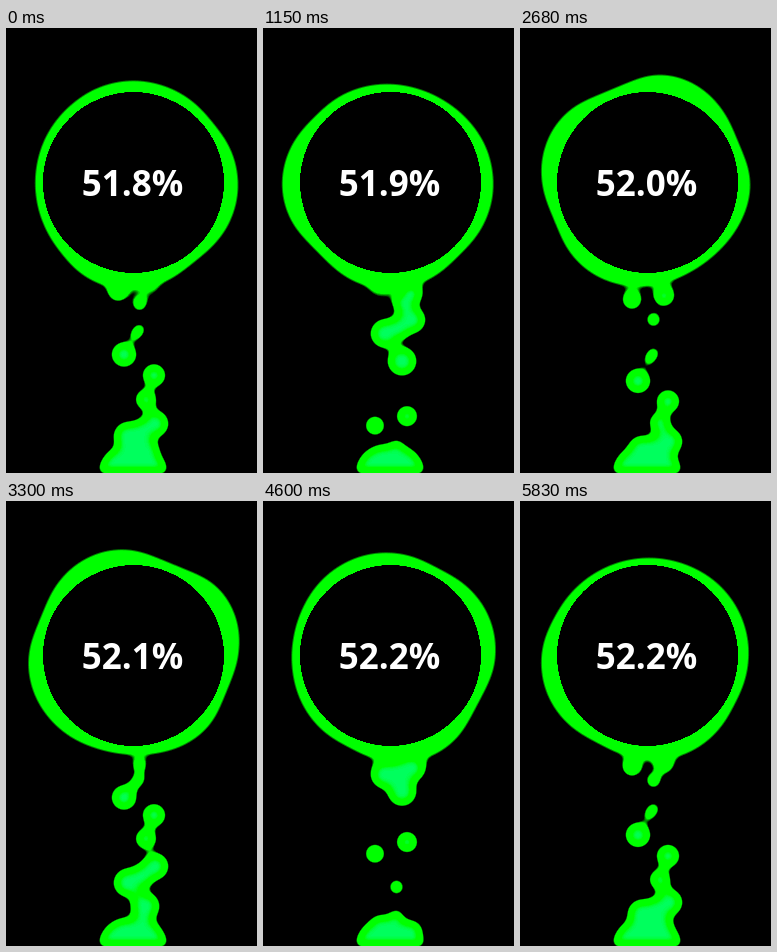
These frames come from a looping animation (251x445 px, 5900 ms). An HTML page:

```html
<!DOCTYPE html>
<html lang="en">
<head>
<meta charset="utf-8">
<title>Charging</title>
<style>
html, body { margin: 0; width: 100%; height: 100%; overflow: hidden; background: #000; }
div, i { position: absolute; }
/* blurred shapes under a strong contrast melt into each other */
#goo { left: 0; top: 0; width: 251px; height: 445px; overflow: hidden; background: #000; filter: contrast(10); }
#halo { left: 0; top: 0; width: 100%; height: 100%; filter: blur(8px); }
#ring { left: 27px; top: 54.5px; width: 200px; height: 200px; background: #0f0; }
#bubbles { left: 0; top: 0; width: 100%; height: 100%; filter: blur(5px); }
#bubbles i { border-radius: 50%; background: #00ff7c; }
#bubbles #base { left: 92px; top: 416px; width: 70px; height: 30px; border-radius: 30px 30px 0 0; }
#hole { left: 36.5px; top: 64px; width: 181px; height: 181px; border-radius: 50%; background: #000; }
#level { left: 0; top: 137px; width: 253px; text-align: center; color: #fff; font: bold 35px/1 "Noto Sans", "Open Sans", sans-serif; }
</style>
</head>
<body>
<div id="goo">
  <div id="halo"><div id="ring"></div></div>
  <div id="bubbles"><i id="base"></i></div>
  <div id="hole"></div>
</div>
<div id="level"></div>
<script>
const LOOP = 5900, STEP = LOOP / 77, SPEED = 60 / 59;
const RISE = 3000, TURN = 10000, START_Y = 432, HEIGHT = 170;
const byId = id => document.getElementById(id);
const clips = [];

// paused animation, positioned by the clock; phase is the part already played
function addClip(el, frames, duration, phase) {
  const anim = el.animate(frames, { duration, iterations: Infinity });
  anim.pause();
  clips.push({ anim, offset: phase * duration });
}

const corners = '42% 38% 62% 49% / 45%';
addClip(byId('ring'), [
  { transform: 'rotate(0deg)', borderRadius: corners },
  { borderRadius: '45% / 42% 38% 58% 49%', offset: 0.5 },
  { transform: 'rotate(720deg)', borderRadius: corners }
], TURN, 0.696);

// x, radius, phase
const bubbles = [
  [112, 9.6, 0.922], [144, 11.2, 0.962], [118, 13, 0.571], [148, 12.1, 0.499],
  [140, 11.2, 0.415], [133.5, 6.4, 0.668], [129, 6, 0.642], [133.5, 7.8, 0.802],
  [139, 14.9, 0.158], [149, 14, 0.32], [122, 15, 0.26], [136, 13, 0.285]
];
const easing = 'ease-in-out';
for (const [x, r, phase] of bubbles) {
  const dot = document.createElement('i');
  dot.style.cssText = `left:${x - r}px;top:${START_Y - r}px;width:${2 * r}px;height:${2 * r}px`;
  byId('bubbles').append(dot);
  addClip(dot, [
    { transform: 'translateY(0px)', opacity: 1, easing },
    { opacity: 1, offset: 0.9, easing },
    { transform: `translateY(${-HEIGHT}px)`, opacity: 0.1 }
  ], RISE, phase);
}

function draw(now) {
  const frame = Math.min(76, Math.floor((now % LOOP + 8) / STEP));
  const t = frame * STEP;
  for (const { anim, offset } of clips) anim.currentTime = t * SPEED + offset;
  const ticks = Math.floor((t + 1020) / 1400);
  byId('level').textContent = (51.8 + ticks / 10).toFixed(1) + '%';
}

const began = performance.now();
function loop() {
  draw(performance.now() - began);
  requestAnimationFrame(loop);
}
loop();
</script>
</body>
</html>
```
